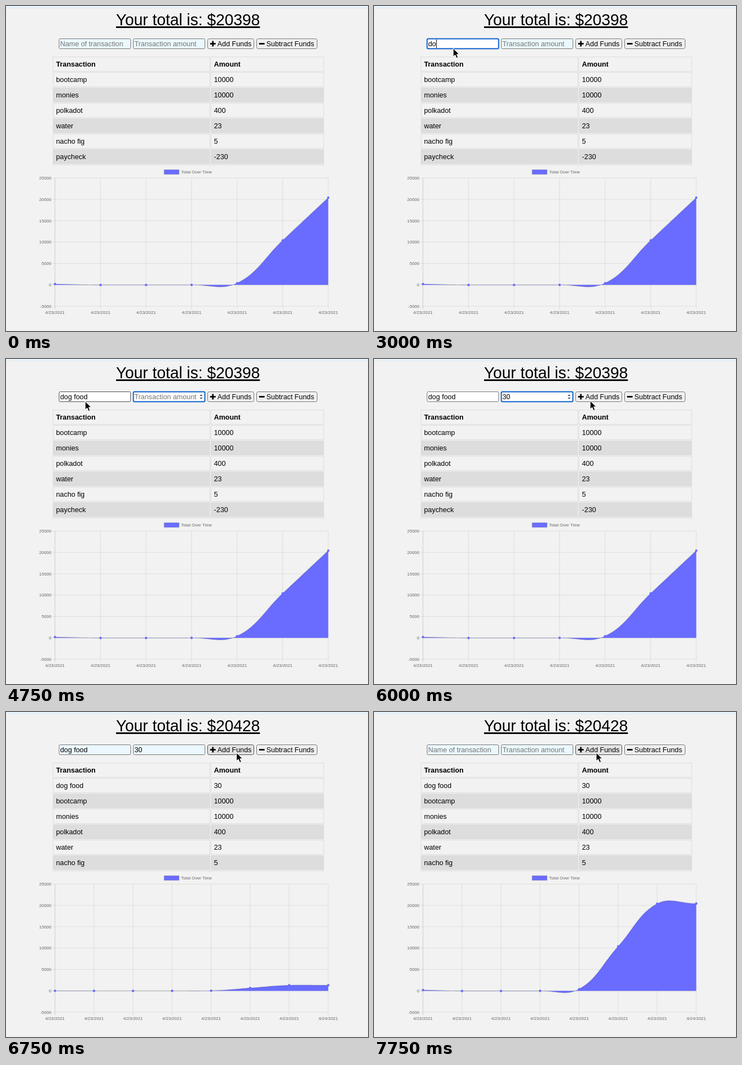
Recreate the animation shown at these times as an HTML page. Size 658 px wide and 590 px high, loop 8000 ms.

```html
<!DOCTYPE html>
<html lang="en">
<head>
<meta charset="utf-8">
<title>Budget tracker</title>
<style>
  html, body { margin: 0; width: 100%; height: 100%; overflow: hidden; background: #f2f2f2; }
  svg { display: block; }
  text { font: 12.8px "Liberation Sans", Arial, sans-serif; }
  .title { font-size: 28.8px; text-decoration: underline; }
  .head { font-weight: bold; }
  .small { font-size: 8px; fill: #666; }
  .hint { fill: #757575; }
</style>
</head>
<body>
<svg id="stage" width="658" height="590" viewBox="0 0 658 590">
  <defs><clipPath id="tableClip"><rect x="80" y="90" width="510" height="201"/></clipPath></defs>
  <rect width="658" height="590" fill="#f2f2f2"/>
  <rect width="658" height="3" fill="#eaf7fe"/>
  <rect y="3" width="658" height="1" fill="#dfe5e8"/>
  <g id="title"></g>
  <g id="form"></g>
  <g id="table" clip-path="url(#tableClip)"></g>
  <g id="chart"></g>
  <path id="cursor" d="M0 0V15L3.5 11.8L6 17.6L8.7 16.5L6.3 10.8H11Z" stroke="#fff" stroke-width="1"/>
</svg>
<script>
const LOOP = 8000, STEP = 250, ADDED = 6750;
const PURPLE = '#696cff';
const OLD_ROWS = [['bootcamp', 10000], ['monies', 10000], ['polkadot', 400],
  ['water', 23], ['nacho fig', 5], ['paycheck', -230], ['', 200]];
const NEW_ROWS = [['dog food', 30], ...OLD_ROWS];

// Each track lists [start time, value]; a value holds until the next start.
const NAME = [[0, ''], [2750, 'd'], [3000, 'do'], [3500, 'dog'], [3750, 'dog fo'], [4000, 'dog food'], [7000, '']];
const AMOUNT = [[0, ''], [5000, '3'], [5250, '30'], [7000, '']];
const FOCUS = [[0, ''], [1750, 'name'], [4250, 'amount'], [6500, '']];
const CARET = [[0, false], [1750, true], [2250, false], [2750, true], [4750, false], [5000, true], [5750, false], [6250, true]];
const CURSOR = [[0, null], [250, [283, 33]], [500, [244, 52]], [750, [202, 67]], [1000, [171, 72]],
  [1500, [151, 75]], [1750, [144, 77]], [5750, [292, 83]], [6000, [393, 76]], [6250, [413, 73]],
  [6500, [419, 74]], [7250, [415, 74]], [7500, [408, 74]], [7750, [404, 74]]];

const $ = id => document.getElementById(id);
const at = (track, t) => track.filter(([start]) => start <= t).pop()[1];
const text = (x, y, s, cls = '', extra = '') => `<text x="${x}" y="${y}" class="${cls}" ${extra}>${s}</text>`;
const box = (x, y, w, h, fill, stroke, extra = '') =>
  `<rect x="${x}" y="${y}" width="${w}" height="${h}" fill="${fill}" stroke="${stroke}" ${extra}/>`;
const line = (x1, y1, x2, y2, alpha) =>
  `<path d="M${x1} ${y1}L${x2} ${y2}" stroke="#000" stroke-opacity="${alpha}" stroke-width=".8"/>`;

function field(x, value, hint, { focused, hovered, fill }) {
  const stroke = focused ? '#0b61cc' : hovered ? '#4c4c4c' : '#767676';
  return box(x + .5, 59.5, 130, 18, fill, stroke, `rx="2" stroke-width="${focused ? 2 : 1}"`) +
    text(x + 2.5, 73, value || hint, value ? 'value' : 'hint');
}

function button(x, w, label, hovered) {
  return box(x + .5, 59.5, w, 18, hovered ? '#e3e3e3' : '#efefef', hovered ? '#4c4c4c' : '#767676', 'rx="3"') +
    `<path d="M${x + 5} 68.5h10" stroke="#000" stroke-width="2.8"/>` + text(x + 18.3, 73, label);
}

function drawForm(t) {
  const focus = at(FOCUS, t), name = at(NAME, t), amount = at(AMOUNT, t);
  const idle = '#ebf8ff', active = '#fff';
  const nameLit = t >= 1500 && t < 6500;
  let out = field(96, name, 'Name of transaction', {
    focused: focus === 'name', hovered: t >= 1500 && t < 5750,
    fill: !nameLit ? idle : t < 1750 ? '#f7f8f9' : active });
  out += field(231, amount, 'Transaction amount', {
    focused: focus === 'amount', hovered: false, fill: focus === 'amount' ? active : idle });
  if (focus === 'amount')
    out += '<path d="M352 67.3l2.7-3 2.7 3zM352 70l2.7 3 2.7-3z" fill="#505050"/>';
  out += button(366, 84, 'Add Funds', t >= 6250) + '<path d="M376 63.5v10" stroke="#000" stroke-width="2.8"/>';
  out += button(455, 110, 'Subtract Funds', false);
  $('form').innerHTML = out;

  if (focus && at(CARET, t)) {
    const typed = focus === 'name' ? name : amount;
    const width = typed ? $('form').querySelectorAll('text')[focus === 'name' ? 0 : 1].getComputedTextLength() : 0;
    const x = Math.round((focus === 'name' ? 98.5 : 233.5) + width);
    $('form').innerHTML += `<rect x="${x}" y="61" width="1" height="15"/>`;
  }
}

function drawTable(rows) {
  $('table').innerHTML = [['Transaction', 'Amount'], ...rows].map(([name, amount], i) => {
    const y = 92.5 + 28 * i, fill = i && i % 2 === 0 ? '#ddd' : 'none', cls = i ? '' : 'head';
    return box(85.5, y, 285, 26, fill, '#ddd') + box(372.5, y, 205, 26, fill, '#ddd') +
      text(91, y + 17.5, name, cls) + text(378, y + 17.5, amount, cls);
  }).join('');
}

// Smooth curve whose handles follow the neighbours' direction, tension 0.4.
function spline(points) {
  const handles = points.map((p, i) => {
    const a = points[i - 1] || p, b = points[i + 1] || p;
    const before = Math.hypot(p[0] - a[0], p[1] - a[1]), after = Math.hypot(b[0] - p[0], b[1] - p[1]);
    const shift = k => [p[0] + k * (b[0] - a[0]), p[1] + k * (b[1] - a[1])];
    const unit = .4 / (before + after);
    return { into: shift(-unit * before), out: shift(unit * after) };
  });
  return 'M' + points[0] + points.slice(1).map((p, i) => `C${handles[i].out} ${handles[i + 1].into} ${p}`).join('');
}

function drawChart(rows, grow) {
  const left = 89, right = 585.7, zero = 506.2, unit = 38.78;
  const pitch = (right - left) / (rows.length - 1);
  let sum = 0;
  const points = rows.map(r => r[1]).reverse().map((v, i) => [left + i * pitch, zero - (sum += v) / 5000 * unit]);
  let out = box(287.5, 297.3, 27, 8.2, PURPLE, '#000', 'stroke-opacity=".1" stroke-width="2"') +
    text(318.3, 304, 'Total Over Time', 'small');
  for (let k = -1; k <= 5; k++) {
    const y = zero - k * unit;
    out += line(84, y, right, y, k ? .11 : .22) + text(82.5, y + 2.8, k * 5000, 'small', 'text-anchor="end"');
  }
  points.forEach(([x], i) => {
    out += line(x, zero - 5 * unit, x, zero + unit + 5, i ? .11 : .2) +
      text(x, 559, i === 7 ? '4/24/2021' : '4/23/2021', 'small', 'text-anchor="middle"');
  });
  const curve = spline(points);
  out += `<g transform="translate(0 ${zero * (1 - grow)}) scale(1 ${grow})">` +
    `<path d="${curve}L${right} ${zero}H${left}Z" fill="${PURPLE}"/>` +
    `<path d="${curve}" fill="none" stroke="#000" stroke-opacity=".1" stroke-width="2" vector-effect="non-scaling-stroke"/></g>`;
  out += points.map(([x, y]) =>
    `<circle cx="${x}" cy="${zero + (y - zero) * grow}" r="2.2" fill="${PURPLE}"/>`).join('');
  $('chart').innerHTML = out;
}

function draw(t) {
  const added = t >= ADDED, rows = added ? NEW_ROWS : OLD_ROWS;
  const progress = added ? Math.min(1, (t - ADDED + 16.5) / 1000) : 1;
  $('title').innerHTML = text(200, 35, `Your total is: $${added ? 20428 : 20398}`, 'title');
  drawForm(t);
  drawTable(rows);
  drawChart(rows, 1 - (1 - progress) ** 4);
  const tip = at(CURSOR, t);
  $('cursor').setAttribute('visibility', tip ? 'visible' : 'hidden');
  if (tip) $('cursor').setAttribute('transform', `translate(${tip})`);
}

const began = performance.now();
let shown = -1;
function tick() {
  const t = Math.floor((performance.now() - began) % LOOP / STEP) * STEP;
  if (t !== shown) draw(shown = t);
  requestAnimationFrame(tick);
}
tick();
</script>
</body>
</html>
```
